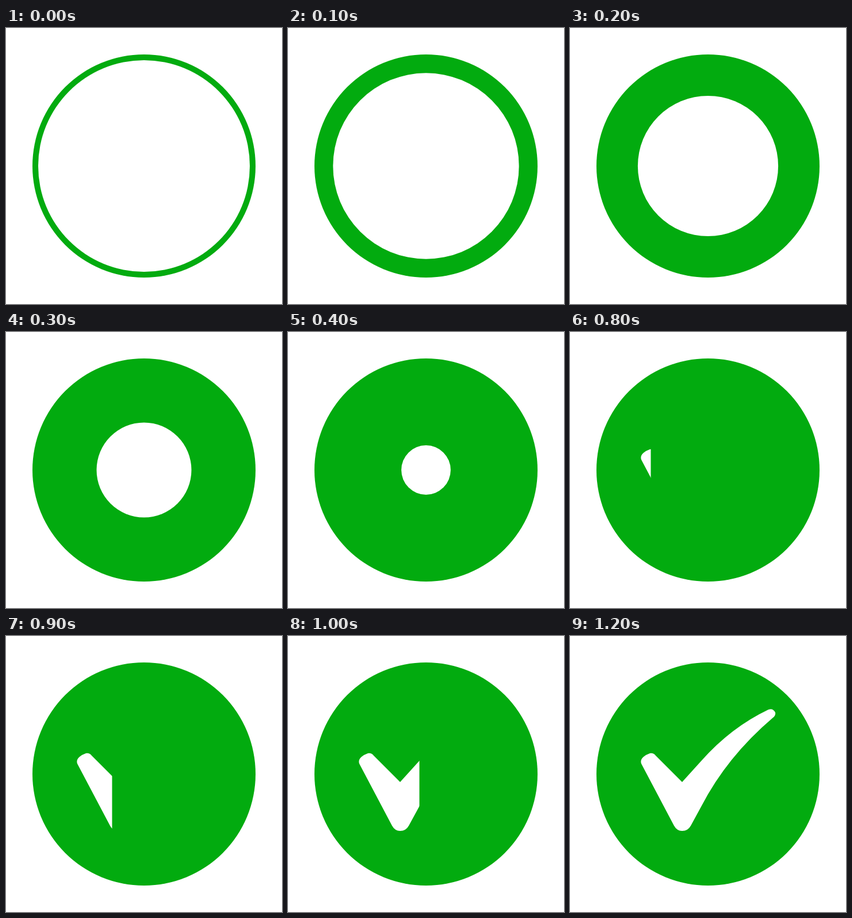
These frames come from a looping animation (480 px wide and 480 px high, 1.3 s). An HTML page:

```html
<!DOCTYPE html>
<html lang="en">
<head>
<meta charset="utf-8">
<title>Check mark</title>
<style>
html, body { margin: 0; width: 100%; height: 100%; overflow: hidden; background: #fff; }
svg { display: block; width: 100%; height: 100%; }
</style>
</head>
<body>
<svg viewBox="0 0 480 480">
  <clipPath id="wipe"><rect id="edge" width="0" height="480"/></clipPath>
  <circle cx="240" cy="240" r="194" fill="#02ab0f"/>
  <circle id="hole" cx="240" cy="240" r="184" fill="#fff"/>
  <path clip-path="url(#wipe)" fill="#fff" d="M124.500 223Q121 216 128 210Q133 206 139 204Q145 203 149 208L195 254L228.500 217Q280 159 345 128Q353 125 357 133Q358 138 353 142Q273 210 228.500 296L210 330Q205 339 195 339Q186 339 181 330Z"/>
</svg>
<script>
const LOOP = 1300, STEP = 100;
const hole = document.getElementById('hole');
const edge = document.getElementById('edge');
const start = performance.now();

// The disc fills inwards, then the tick is wiped in from the left.
function draw(now) {
  const step = Math.floor(Math.max(0, now - start) % LOOP / STEP);
  const radius = Math.max(0, Math.min(184, 201.3 - 39.6 * step));
  const width = step < 12 ? Math.max(0, 44 * step - 211.5) : 480;
  hole.setAttribute('r', radius);
  edge.setAttribute('width', width);
  requestAnimationFrame(draw);
}
draw(start);
</script>
</body>
</html>
```
